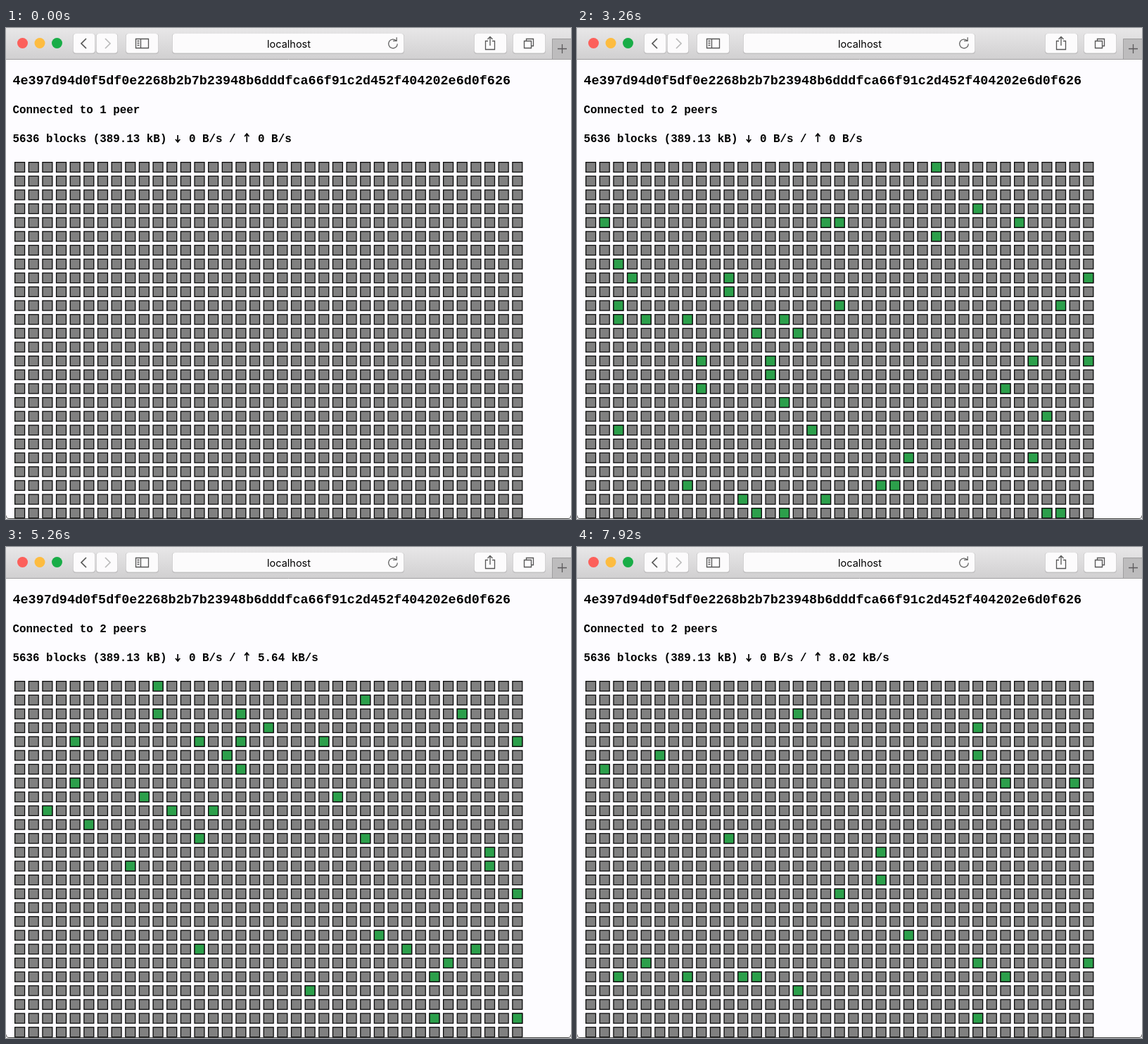
Write an HTML page with a canvas that moves like this. It is 803 px wide and 697 px high and loops after 8 s.

```html
<!DOCTYPE html>
<html lang="en">
<head>
<meta charset="utf-8">
<title>Block activity</title>
<style>
  html, body { margin: 0; width: 100%; height: 100%; overflow: hidden; background: #fdfcff; }
  canvas { display: block; }
</style>
</head>
<body>
<canvas id="stage" width="803" height="697"></canvas>
<script>
const ctx = document.getElementById('stage').getContext('2d');
const LOOP = 8000, COLS = 37, ROWS = 26, PITCH = 19.645, SIZE = 15.2, BORDER = 1.3;
const FLASHES = 150, FIRST_FLASH = 2450;
const MONO = '"Liberation Mono", monospace';
const HASH = '4e397d94d0f5df0e2268b2b7b23948b6dddfca66f91c2d452f404202e6d0f626';

function random(seed) {
  const v = Math.sin(seed * 12.9898) * 43758.5453;
  return v - Math.floor(v);
}

// Two blocks light up first; the rest follow quickly, then more slowly.
const flashes = [
  { row: 4, col: 17, on: 2240, off: 4480 },
  { row: 23, col: 7, on: 2360, off: 4640 }
];
for (let i = 0; i < FLASHES; i++) {
  const on = FIRST_FLASH + (LOOP - FIRST_FLASH) * (i / FLASHES) ** 1.5;
  flashes.push({
    row: Math.floor(random(i + 1) * ROWS),
    col: Math.floor(random(i + 501) * COLS),
    on,
    off: on + 700 + 1000 * random(i + 1001)
  });
}

function uploadSpeed(t) {
  if (t < 3320) return '0 B/s';
  if (t < 4680) return '2.05 kB/s';
  return t < 7040 ? '5.64 kB/s' : '8.02 kB/s';
}

function path(d, color, width = 1.3) {
  ctx.strokeStyle = color;
  ctx.lineWidth = width;
  ctx.stroke(new Path2D(d));
}

function dot(x, y, color) {
  ctx.fillStyle = color;
  ctx.beginPath();
  ctx.arc(x, y, 7.5, 0, 7);
  ctx.fill();
}

function button(x, w) {
  const layer = (inset, color) => {
    ctx.fillStyle = color;
    ctx.beginPath();
    ctx.roundRect(x + inset, 8, w - 2 * inset, 29 - 2 * inset, 4);
    ctx.fill();
  };
  layer(0, '#c2c1c2');
  layer(.7, '#fcfbfc');
}

function text(str, x, y, font) {
  ctx.fillStyle = '#000';
  ctx.font = font;
  ctx.fillText(str, x, y);
  return x + ctx.measureText(str).width;
}

function drawToolbar() {
  const shade = ctx.createLinearGradient(0, 0, 0, 44);
  shade.addColorStop(0, '#e8e7e8');
  shade.addColorStop(1, '#d1d0d1');
  ctx.fillStyle = shade;
  ctx.fillRect(0, 0, 803, 44);

  ctx.fillStyle = '#bdbcbd';
  ctx.fillRect(776, 15, 27, 29);
  path('M803 15.5H776.5V44M0 44.5H803', '#a09fa0', 1);
  path('M784 29.5H797M790.5 23V36', '#5c5a5c');

  dot(23.5, 21.5, '#fc605b');
  dot(48, 21.5, '#fdbc40');
  dot(72.5, 21.5, '#19ad47');

  button(95, 32);
  button(128, 31);
  button(170, 47);
  button(236, 330);
  button(665, 47);
  button(720, 47);

  path('M114 15L107 22L114 29', '#555', 1.7);
  path('M141 15L148 22L141 29', '#bbb', 1.7);
  path('M184.5 15.5H202.5V28.5H184.5ZM191.5 15.5V28.5M186.5 18.5H189.5M186.5 21.5H189.5M186.5 24.5H189.5', '#555');
  path('M685 18.5H681.5V30.5H694.5V18.5H691M688 25V12.5M684.5 16L688 12.5L691.5 16', '#555');
  path('M736.5 18.5H746.5V28.5H736.5ZM739.5 18V15.5H749.5V25.5H747', '#555');
  path('M554.5 18A6.3 6.3 0 1 0 556.3 22.5M550 18.3H555.2V13.2', '#666');

  ctx.textAlign = 'center';
  text('localhost', 402, 28, '14.5px Inter, sans-serif');
  ctx.textAlign = 'left';
}

// Draws an arrow of the given height and returns where the text goes on.
function arrow(x, tail, tip) {
  const mid = x + 6.2, bend = tip + 4 * Math.sign(tail - tip);
  path(`M${mid} ${tail}V${tip}M${mid - 3.2} ${bend}L${mid} ${tip}L${mid + 3.2} ${bend}`, '#000', 1.7);
  return x + 12.5;
}

function drawStatus(t) {
  const font = `bold 15.87px ${MONO}`;
  text(HASH, 9.5, 80, `bold 18.43px ${MONO}`);
  text(`Connected to ${t < 1760 ? '1 peer' : '2 peers'}`, 9.5, 121, font);
  let x = text('5636 blocks (389.13 kB) ', 9.5, 162, font);
  x = text(' 0 B/s / ', arrow(x, 152, 162), 162, font);
  text(' ' + uploadSpeed(t), arrow(x, 162, 150), 162, font);
}

function drawBlock(row, col, color) {
  const x = 12 + col * PITCH, y = 190 + row * PITCH;
  ctx.fillStyle = '#0a0a0a';
  ctx.fillRect(x, y, SIZE, SIZE);
  ctx.fillStyle = color;
  ctx.fillRect(x + BORDER, y + BORDER, SIZE - 2 * BORDER, SIZE - 2 * BORDER);
}

function drawBlocks(t) {
  for (let row = 0; row < ROWS; row++) {
    for (let col = 0; col < COLS; col++) drawBlock(row, col, '#808080');
  }
  for (const { row, col, on, off } of flashes) {
    if (t >= on && t < off) drawBlock(row, col, '#2c9f4b');
  }
}

function draw(now) {
  const t = now % LOOP;
  ctx.fillStyle = '#fdfcff';
  ctx.fillRect(0, 0, 803, 697);
  drawToolbar();
  drawStatus(t);
  drawBlocks(t);
  path('M0 692Q0 696.5 5 696.5H798Q803 696.5 803 692', '#444', 1);
  requestAnimationFrame(draw);
}
requestAnimationFrame(draw);
</script>
</body>
</html>
```
